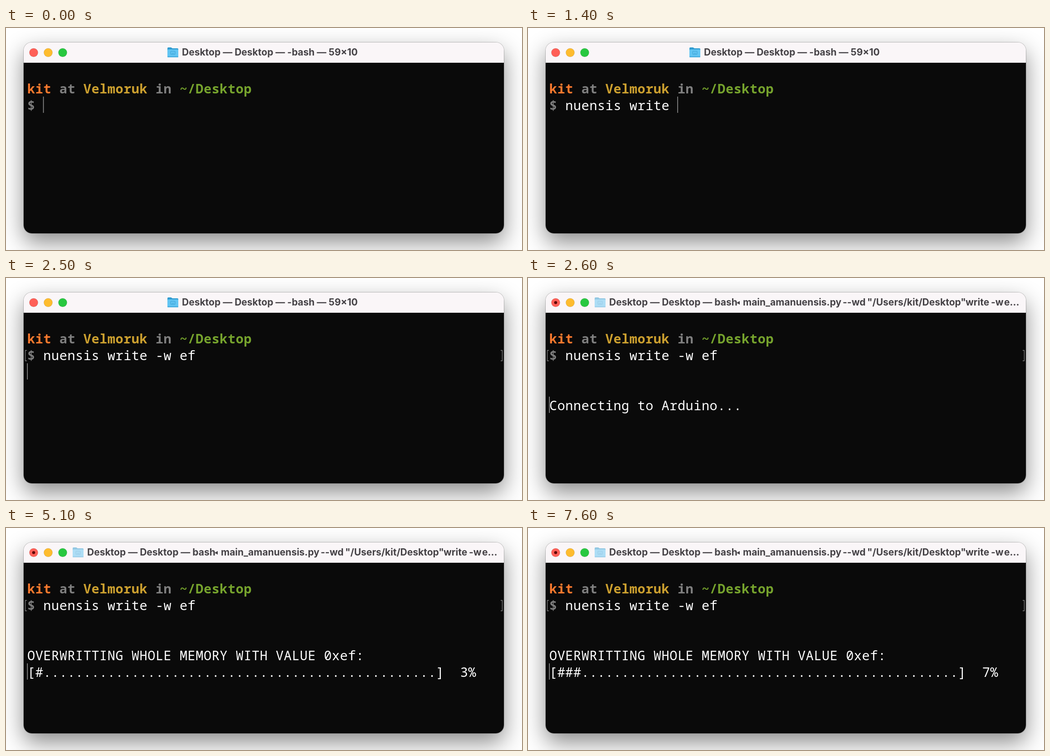
Animation, 1138 px wide and 492 px high, one loop 8000 ms. Source, as an HTML page:

```html
<!DOCTYPE html>
<html lang="en">
<head>
<meta charset="utf-8">
<title>Terminal</title>
<style>
  html, body { margin: 0; width: 100%; height: 100%; overflow: hidden; background: #fff; }
  .window {
    position: absolute; left: 39px; top: 32px; width: 1059px; height: 423px;
    border-radius: 18px;
    background: linear-gradient(#faf6f8 45px, #0a0a0a 45px);
    box-shadow: 0 0 0 1px rgba(0, 0, 0, .22), 0 20px 50px rgba(0, 0, 0, .46);
  }
  svg { position: absolute; left: 0; top: 0; }
  text { white-space: pre; }
  .term text {
    font: 28.5px "Noto Sans Mono", "DejaVu Sans Mono", monospace;
    letter-spacing: .58px; fill: #fff;
  }
  .term .prompt { font-weight: 700; fill: #7f7f7f; }
  .title { font: 700 21px Inter, "Liberation Sans", sans-serif; fill: #454246; }
</style>
</head>
<body>
<div class="window"></div>
<svg width="1138" height="492" viewBox="0 0 1138 492">
  <defs>
    <g id="folder">
      <path d="M0 4V2Q0 0 2 0H8L11 2H22Q24 2 24 4V9H0Z" fill="#2f9bd0"/>
      <rect y="4.5" width="24" height="17.5" rx="2" fill="#62c5f3"/>
      <rect y="19.5" width="24" height="2.5" rx="1.2" fill="#4aaee0"/>
      <rect x="7" y="8.5" width="10" height="7" rx="1" fill="none" stroke="#3a9fd3"/>
      <path d="M9 13H15" stroke="#3a9fd3"/>
    </g>
  </defs>

  <g stroke-opacity=".12" stroke="#000">
    <circle cx="61" cy="54.5" r="9.5" fill="#ff5f57"/>
    <circle cx="93" cy="54.5" r="9.5" fill="#febc2e"/>
    <circle cx="125" cy="54.5" r="9.5" fill="#28c840"/>
  </g>

  <g id="idle">
    <use href="#folder" x="356" y="43"/>
    <text class="title" x="388" y="61">Desktop — Desktop — -bash — 59×10</text>
  </g>
  <g id="busy">
    <circle cx="61" cy="54.5" r="3.3" fill="#5c0303"/>
    <use href="#folder" x="147" y="43" opacity=".5"/>
    <text class="title" y="61"><tspan x="179">Desktop — Desktop — bash</tspan><tspan x="474">main_amanuensis.py</tspan><tspan x="694">--wd</tspan><tspan x="748">"/Users/kit/Desktop"</tspan><tspan x="965">write</tspan><tspan x="1021">-w</tspan><tspan x="1050">e…</tspan></text>
    <path d="M467 51V59L460 55Z" fill="#454246"/>
  </g>

  <g class="term">
    <text class="prompt" x="47" y="145"><tspan fill="#fc7a2e">kit</tspan> at <tspan fill="#cca02f">Velmoruk</tspan> in <tspan fill="#76a32d">~/Desktop</tspan></text>
    <text class="prompt" x="47" y="182">$</text>
    <text id="command" x="82.36" y="182"></text>
    <path id="marks" d="M46 160.5H42.5V183.5H46M1091 160.5H1094.5V183.5H1091" fill="none" stroke="#808080" stroke-width="1.3"/>
    <text id="status" x="47" y="293"></text>
    <text id="progress" x="47" y="330"></text>
    <rect id="cursor" width="1.6" height="36" fill="#929292"/>
  </g>
</svg>
<script>
  const LOOP = 8000, LEFT = 47, CELL = 17.68;
  const COMMAND = "nuensis write -w ef";
  const PERCENT_TIMES = [3900, 4500, 5100, 5800, 6300, 7000, 7600];
  const $ = id => document.getElementById(id);
  const clamp = (v, max) => Math.max(0, Math.min(max, v));
  const show = (id, on) => $(id).setAttribute("visibility", on ? "visible" : "hidden");

  function setText(id, text) {
    if ($(id).textContent !== text) $(id).textContent = text;
  }

  function moveCursor(column, y) {
    $("cursor").setAttribute("x", LEFT + column * CELL - .6);
    $("cursor").setAttribute("y", y);
  }

  // Three bursts of typing, one character per 100 ms.
  function typedCount(t) {
    const tick = Math.floor(t / 100);
    return clamp(tick, 14) + clamp(tick - 15, 3) + clamp(tick - 20, 2);
  }

  function progressBar(t) {
    const percent = PERCENT_TIMES.filter(at => at <= t).length;
    const bar = "#".repeat(percent >> 1).padEnd(50, ".");
    return `[${bar}]  ${percent}%`;
  }

  function draw(t) {
    const entered = t >= 2500, running = t >= 2600, writing = t >= 3300;
    const typed = typedCount(t);
    show("idle", !running);
    show("busy", running);
    show("marks", entered);
    setText("command", COMMAND.slice(0, typed));
    setText("status", writing ? "OVERWRITTING WHOLE MEMORY WITH VALUE 0xef:"
      : running ? "Connecting to Arduino..." : "");
    setText("progress", writing ? progressBar(t) : "");
    if (entered) moveCursor(0, writing ? 300 : running ? 263 : 189);
    else moveCursor(2 + typed, 152);
  }

  function frame() {
    draw(performance.now() % LOOP);
    requestAnimationFrame(frame);
  }
  frame();
</script>
</body>
</html>
```
